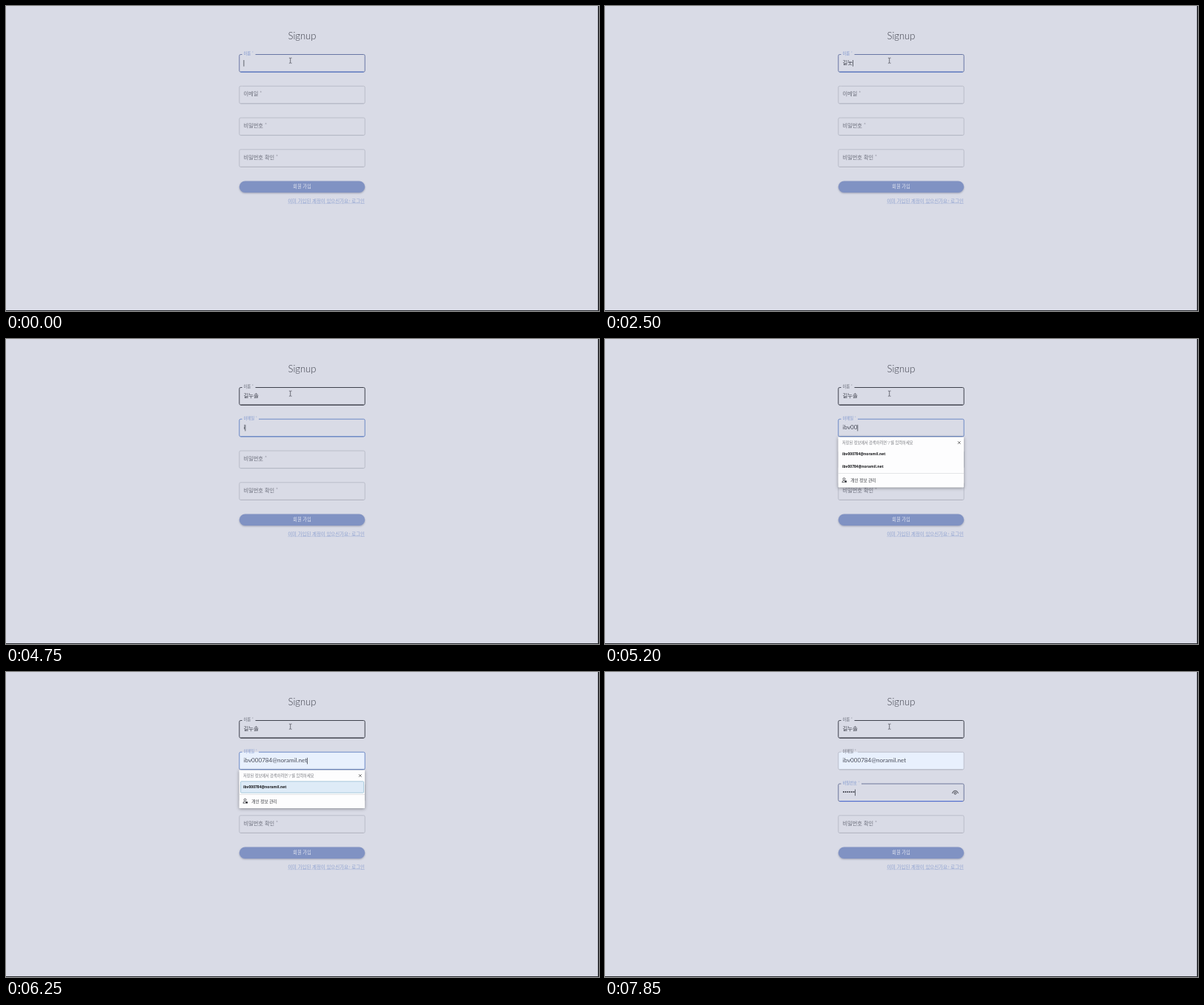
Write an HTML page that moves like this. It is 800x412 px and loops after 8000 ms.

```html
<!DOCTYPE html>
<html lang="ko">
<head>
<meta charset="utf-8">
<title>Signup</title>
<style>
  html, body { margin: 0; width: 100%; height: 100%; overflow: hidden; background: #d9dbe6; }
  svg { display: block; width: 100vw; height: 100vh; }
  text { font-family: Lato, "Noto Sans CJK KR", "Noto Sans CJK", sans-serif; white-space: pre; }
  .bold { font-family: "Open Sans", "Noto Sans", sans-serif; font-weight: 700; }
  #popup { filter: drop-shadow(0 1.5px 2px rgba(0, 0, 0, .38)); }
  #button { filter: drop-shadow(0 1px 1px rgba(60, 70, 110, .4)); }
</style>
</head>
<body>
<svg id="stage" viewBox="0 0 800 412" xmlns="http://www.w3.org/2000/svg"></svg>
<script>
const LOOP = 8000;
const stage = document.getElementById('stage');
const LEFT = 314.8, RIGHT = 484.2, TEXT_X = 320.5;
const IDLE = [178, 181, 194], HOVER = [62, 65, 76], BLUE = [102, 132, 196];
const LABEL = [106, 109, 122], LABEL_BLUE = [128, 152, 206];

function add(tag, attrs, parent = stage, content) {
  const node = document.createElementNS('http://www.w3.org/2000/svg', tag);
  set(node, attrs);
  if (content !== undefined) node.textContent = content;
  parent.appendChild(node);
  return node;
}
function set(node, attrs) {
  for (const key in attrs) node.setAttribute(key, attrs[key]);
}
function label(x, y, size, fill, content, parent = stage, extra = {}) {
  return add('text', { x, y, 'font-size': size, fill, ...extra }, parent, content);
}
const show = (node, on) => set(node, { visibility: on ? 'visible' : 'hidden' });
const clamp = v => Math.max(0, Math.min(1, v));
const easeOut = v => 1 - Math.pow(1 - clamp(v), 3);
const mix = (a, b, p) => a + (b - a) * p;
const rgb = (a, b, p) => `rgb(${a.map((v, i) => Math.round(mix(v, b[i], p)))})`;

// Latest value of a [time, value] list.
function at(steps, t) {
  let value = steps[0][1];
  for (const [time, v] of steps) if (t >= time) value = v;
  return value;
}

const nameSteps = [
  [0, ''], [100, 'r'], [200, 'rl'], [450, 'rlf'], [750, 'rl'], [850, 'r'], [950, ''],
  [1050, 'r'], [1200, 'rl'], [1350, 'rlf'], [1400, 'rl'], [1450, 'r'], [1650, ''],
  [1750, 'ㄱ'], [1850, '기'], [1950, '길'], [2100, '길ㄴ'], [2200, '길누'],
  [2500, '길눗'], [2550, '길누소'], [2700, '길누솔']
];
const mail = 'ibv000784@noramil.net';
const mailSteps = [
  [0, ''], [3900, 'ㅑ'], [4000, 'ㅑㅠ'], [4350, 'ㅑ'], [4500, ''], [4750, 'i'],
  [4850, 'ib'], [4950, 'ibv'], [5050, 'ibv0'], [5200, 'ibv00'], [5350, 'ibv000'],
  [5650, 'ibv0007'], [5700, 'ibv00078'], [5750, 'ibv000784'], [6000, mail]
];
const dotSteps = [[0, 0], [7000, 1], [7150, 2], [7450, 3], [7550, 4], [7600, 5], [7850, 6]];
const rowSteps = [[0, 0], [4800, 3], [5050, 2], [5350, 1], [6350, 0]];
const MAIL_FOCUS = 2880, PASS_FOCUS = 6470;

add('rect', { width: 800, height: 412, fill: '#d9dbe6' });
label(399.5, 44.6, 13, '#3f414c', 'Signup', stage, { 'text-anchor': 'middle', 'font-weight': 300 });

function makeField(top, caption, notch) {
  return {
    top, notch,
    box: add('rect', { x: LEFT, y: top, width: RIGHT - LEFT, height: 23.6, rx: 1.8, fill: 'none' }),
    outline: add('path', { fill: 'none' }),
    base: add('path', { d: `M${LEFT + 1.6} ${top + 23.6}H${RIGHT - 1.6}` }),
    caption: label(TEXT_X, 0, 7.2, '', caption, stage, { 'font-weight': 300 })
  };
}
const fields = [
  makeField(65.5, '이름 *', 336.5),
  makeField(108.2, '이메일 *', 341),
  makeField(151, '비밀번호 *', 346),
  makeField(193.8, '비밀번호 확인 *', 346)
];

function drawField(f, raised, border, caption, width, base) {
  const p = easeOut(raised);
  const gap = mix(318.5, f.notch, p), r = 1.8, bottom = f.top + 23.6;
  const topLine = p > 0 ? `M${gap} ${f.top}` : `M318.5 ${f.top}`;
  set(f.outline, {
    d: `${topLine}H${RIGHT - r}q${r} 0 ${r} ${r}V${bottom - r}q0 ${r} ${-r} ${r}` +
       `H${LEFT + r}q${-r} 0 ${-r} ${-r}V${f.top + r}q0 ${-r} ${r} ${-r}H318.5`,
    stroke: border, 'stroke-width': width
  });
  set(f.base, { stroke: base || border, 'stroke-width': width });
  set(f.caption, { y: f.top + mix(13.2, .8, p), 'font-size': mix(7.2, 5.3, p), fill: caption });
}

const nameText = label(TEXT_X, 79.3, 7.4, '#3c3f4a', '');
const mailText = label(TEXT_X, 122.4, 8.1, '#4b4f5c', '');
const dots = Array.from({ length: 6 }, (_, i) =>
  add('circle', { cx: 321.9 + i * 2.75, cy: 161.9, r: .98, fill: '#343640' }));
const caret = add('rect', { width: .8, height: 8.6, fill: '#41454f' });

const eye = add('g', { fill: 'none', stroke: '#34363e', 'stroke-width': .9 });
add('path', { d: 'M468.5 164q.8-3.6 4-3.6t4 3.6' }, eye);
add('circle', { cx: 472.5, cy: 163.7, r: 1.4 }, eye);

add('rect', { id: 'button', x: 314.8, y: 236.5, width: 169.4, height: 15.6, rx: 7.8, fill: '#8092c3' });
label(399.5, 245.9, 6.3, '#e1e4f0', '회원 가입', stage, { 'text-anchor': 'middle' });
const link = label(484, 266, 6.4, '#8fa2d0', '이미 가입된 계정이 있으신가요? 로그인', stage,
  { 'text-anchor': 'end', 'font-weight': 300 });
add('rect', { x: 484 - link.getComputedTextLength(), y: 266.6,
  width: link.getComputedTextLength(), height: .5, fill: '#a3b2d8' });

// Autofill list
const popup = add('g', { id: 'popup' });
const sheet = add('rect', { x: 314.5, y: 132.4, width: 169.6, rx: .8, fill: '#fdfdfe' }, popup);
label(320, 142, 5.2, '#74767c', "저장된 정보에서 검색하려면 '/'를 입력하세요", popup);
add('path', { d: 'M476 138.2l3.6 3.6m0-3.6l-3.6 3.6', stroke: '#333', 'stroke-width': .7 }, popup);
const pick = add('rect', { x: 316.6, y: 147.8, width: 166, height: 15.4, rx: .8,
  fill: '#deebf7', stroke: '#8fb9cf', 'stroke-width': .7 }, popup);
const rows = [mail, 'ibv00784@noramil.net', 'ibv07@noramil.net'].map((s, i) =>
  label(320, 157.3 + i * 16.4, 5, '#16171a', s, popup, { class: 'bold' }));
const footer = add('g', {}, popup);
add('rect', { x: 314.5, y: 165, width: 169.6, height: .6, fill: '#d4d5d9' }, footer);
const person = add('g', { fill: 'none', stroke: '#2b2d33', 'stroke-width': .7 }, footer);
add('circle', { cx: 322.5, cy: 172.7, r: 1.5 }, person);
add('path', { d: 'M322.7 177.2h-2.8q0-2.4 2.6-2.4' }, person);
add('rect', { x: 323.2, y: 174.9, width: 2.8, height: 2.5, rx: .5, fill: '#2b2d33', stroke: 'none' }, person);
label(331.3, 176.6, 5.7, '#33353b', '개인 정보 관리', footer);

// Text pointer
add('path', { d: 'M381.9 70.2h1.2l.6.5l.6-.5h1.2M383.7 70.5v6.4M381.9 77.2h1.2l.6-.5l.6.5h1.2',
  fill: 'none', stroke: '#4b4d56', 'stroke-width': .75 });
add('rect', { x: 798.7, y: 0, width: 1.3, height: 412, fill: '#08080c' });
add('rect', { x: 0, y: 411, width: 800, height: 1, fill: '#2a2b30' });

function render(t) {
  const toMail = clamp((t - MAIL_FOCUS) / 200);
  const toPass = clamp((t - PASS_FOCUS) / 200);
  const [first, second, third, fourth] = fields;

  drawField(first, 1, rgb([104, 118, 164], HOVER, toMail), rgb(LABEL_BLUE, LABEL, toMail), 1,
    rgb([82, 118, 200], HOVER, toMail));
  const mailFocus = toMail - toPass;
  drawField(second, toMail, rgb(IDLE, BLUE, mailFocus), rgb(LABEL, LABEL_BLUE, mailFocus),
    mix(.8, .95, mailFocus));
  drawField(third, toPass, rgb(IDLE, [108, 118, 154], toPass), rgb(LABEL, LABEL_BLUE, toPass),
    mix(.8, 1, toPass), rgb(IDLE, [76, 108, 212], toPass));
  drawField(fourth, 0, rgb(IDLE, IDLE, 0), rgb(LABEL, LABEL, 0), .8);
  set(second.box, { fill: t >= 6000 ? '#e8f0fd' : 'none' });

  nameText.textContent = at(nameSteps, t);
  mailText.textContent = at(mailSteps, t);
  const count = at(dotSteps, t);
  dots.forEach((dot, i) => show(dot, i < count));
  show(eye, count > 0);

  let x = TEXT_X, y = 73;
  if (t >= PASS_FOCUS) {
    x += count * 2.75;
    y = 158.6;
  } else if (t >= MAIL_FOCUS) {
    x += mailText.getComputedTextLength();
    y = 115.8;
  } else {
    x += nameText.getComputedTextLength();
  }
  set(caret, { x, y });
  show(caret, !(t >= 3450 && t < 3900));

  const n = at(rowSteps, t);
  set(popup, { display: n ? 'inline' : 'none' });
  set(sheet, { height: 35.2 + n * 16.4 });
  set(footer, { transform: `translate(0 ${Math.max(0, n - 1) * 16.4})` });
  rows.forEach((row, i) => set(row, { display: i < n ? 'inline' : 'none' }));
  set(pick, { display: t >= 6000 ? 'inline' : 'none' });
}

const start = performance.now();
function tick() {
  render((performance.now() - start) % LOOP);
  requestAnimationFrame(tick);
}
tick();
</script>
</body>
</html>
```
